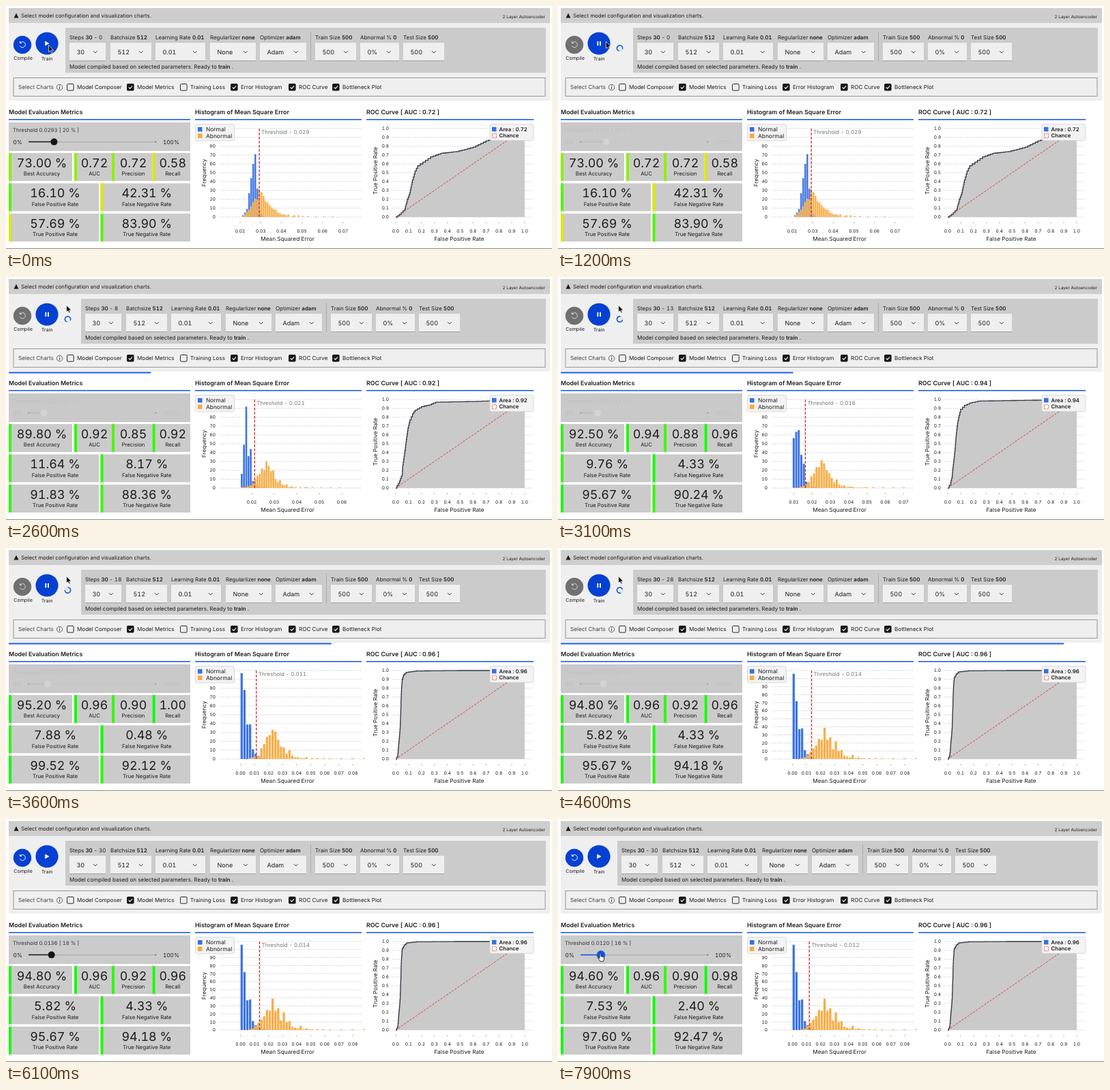
An HTML page that plays this animation: 800 px wide and 357 px high, repeating every 8000 ms.

```html
<!DOCTYPE html>
<html lang="en">
<head>
<meta charset="utf-8">
<title>Model training dashboard</title>
<style>
  html, body { margin: 0; width: 100%; height: 100%; overflow: hidden; background: #fff; }
  svg { display: block; width: 100vw; height: 100vh; }
  text { font-family: Inter, "Open Sans", sans-serif; font-variant-numeric: tabular-nums;
         text-rendering: geometricPrecision; white-space: pre; }
  .b { font-weight: 600; }
</style>
</head>
<body>
<svg viewBox="0 0 800 357" preserveAspectRatio="none"><g id="base"></g><g id="live"></g></svg>
<script>
const LOOP = 8000, FRAME = 100;
const TRAIN_START = 1000, TRAIN_END = 4900;
const BLUE = '#0540d2', RULE = '#1b5fe3', PANEL = '#cbcbcb', SOFT = '#efeff0', INK = '#1c1c1c';

const lerp = (a, b, p) => a + (b - a) * p;
const clamp = v => Math.max(0, Math.min(1, v));
const span = (t, a, b) => clamp((t - a) / (b - a));
const range = n => [...Array(n).keys()];
const rect = (x, y, w, h, fill, extra = '') =>
  `<rect x="${x}" y="${y}" width="${w}" height="${h}" fill="${fill}" ${extra}/>`;
const line = (x1, y1, x2, y2, color, w = 1, extra = '') =>
  `<path d="M${x1} ${y1}L${x2} ${y2}" stroke="${color}" stroke-width="${w}" ${extra}/>`;
const path = (d, color, w, extra = 'fill="none"') =>
  `<path d="${d}" stroke="${color}" stroke-width="${w}" ${extra}/>`;
const circle = (x, y, r, fill, extra = '') =>
  `<circle cx="${x}" cy="${y}" r="${r}" fill="${fill}" ${extra}/>`;
const text = (x, y, size, str, extra = '', fill = INK) =>
  `<text x="${x}" y="${y}" font-size="${size}" fill="${fill}" ${extra}>${str}</text>`;
const bold = s => `<tspan class="b">${s}</tspan>`;
const MID = 'text-anchor="middle"', END = 'text-anchor="end"';

// Model state at a few training steps; everything between is interpolated.
const states = [
  { step: 2, acc: 73, auc: .72, prec: .72, fpr: 16.1, tpr: 57.69, thr: .0293, pct: 20,
    zero: 282.6, unit: 30.2, x0: 347.2, pitch: 3.02, yMax: 100,
    blue: [2, 5, 9, 27, 44, 60, 71, 32, 8, 3, 1],
    orange: [1, 3, 6, 8, 12, 17, 21, 20, 31, 28, 24, 18, 16, 13, 11, 9, 8, 5, 4, 3, 3, 2, 3, 0, 1, 2, 0, 2, 0, 1],
    roc: [0,0, .03,.03, .07,.09, .09,.2, .11,.28, .13,.42, .15,.52, .17,.58, .21,.62, .27,.68, .35,.72, .47,.74, .6,.79, .7,.86, .82,.91, 1,1] },
  { step: 8, acc: 89.8, auc: .92, prec: .85, fpr: 11.64, tpr: 91.83, thr: .0213, pct: 12,
    zero: 294, unit: 33, x0: 345.4, pitch: 3.3, yMax: 100,
    blue: [16, 49, 92, 36, 44, 8, 4, 2, 2, 1, 1],
    orange: [1, 1, 1, 2, 3, 5, 10, 14, 16, 22, 20, 30, 25, 19, 20, 10, 7, 9, 4, 3, 4, 1, 2, 1, 1, 0, 1, 0, 1, 1],
    roc: [0,0, .03,.08, .05,.16, .055,.26, .065,.36, .075,.46, .085,.58, .095,.68, .11,.77, .13,.84, .15,.88, .2,.92, .26,.94, .31,.97, .65,.98, 1,1] },
  { step: 18, acc: 95.2, auc: .96, prec: .9, fpr: 7.88, tpr: 99.52, thr: .0113, pct: 15,
    zero: 343.5, unit: 20.6, x0: 345.3, pitch: 4.12, yMax: 100,
    blue: [97, 78, 39, 39, 11, 6, 3, 2, 1, 2, 1],
    orange: [0, 0, 0, 1, 2, 3, 4, 12, 17, 25, 27, 33, 31, 22, 14, 13, 6, 10, 4, 2, 2, 1, 1, 2, 0, 1, 0, 1, 0, 1],
    roc: [0,0, .015,.04, .02,.12, .025,.2, .03,.28, .035,.37, .037,.46, .04,.58, .042,.7, .045,.8, .05,.9, .06,.95, .08,.98, .16,.995, .5,1, 1,1] },
  { step: 28, acc: 94.8, auc: .96, prec: .92, fpr: 5.82, tpr: 95.67, thr: .0136, pct: 18,
    zero: 343.5, unit: 20.6, x0: 345.3, pitch: 4.12, yMax: 110,
    blue: [106, 72, 37, 38, 11, 6, 3, 2, 1, 1, 1],
    orange: [0, 0, 0, 1, 2, 5, 9, 13, 17, 25, 24, 39, 24, 27, 12, 22, 10, 11, 4, 3, 2, 5, 1, 2, 1, 1, 0, 1, 0, 1],
    roc: [0,0, .015,.04, .02,.11, .025,.2, .03,.28, .035,.38, .037,.48, .04,.6, .042,.72, .045,.82, .05,.92, .065,.96, .085,.985, .16,.997, .5,1, 1,1] },
];
const dragged = { ...states[3], acc: 94.6, prec: .9, fpr: 7.53, tpr: 97.6, thr: .012, pct: 16 };

function mix(a, b, p) {
  const out = {};
  for (const k in a)
    out[k] = Array.isArray(a[k]) ? a[k].map((v, i) => lerp(v, b[k][i], p)) : lerp(a[k], b[k], p);
  return out;
}

function stateAt(t, step) {
  if (t >= 7500) return mix(states[3], dragged, t < 7700 ? .5 : 1);
  if (t >= TRAIN_END) return states[3];
  const i = step < 8 ? 0 : step < 18 ? 1 : 2;
  const a = states[i], b = states[i + 1];
  return mix(a, b, span(step, a.step, b.step));
}

function drawBase() {
  let s = rect(4, 3, 793, 22, '#cecece') + rect(4, 25, 793, 114, SOFT);
  s += `<path d="M11.5 17.5L15 10.5L18.5 17.5Z" fill="${INK}"/>`;
  s += text(22, 17.2, 7.85, 'Select model configuration and visualization charts.');
  s += text(790, 17.5, 6.3, '2 Layer Autoencoder', END);
  s += rect(11, 105.5, 779, 27, 'none', 'stroke="#8f8f8f" stroke-width=".9"');
  s += text(18, 122.3, 8.2, 'Select Charts', '', '#444');
  s += circle(78.6, 119.5, 4.2, 'none', 'stroke="#444" stroke-width=".8"') +
    line(78.6, 118.8, 78.6, 121.8, '#333') + circle(78.6, 117.2, .6, '#333');
  const boxes = [[89, 'Model Composer'], [177, 'Model Metrics', 1], [255, 'Training Loss'],
    [329, 'Error Histogram', 1], [414, 'ROC Curve', 1], [478, 'Bottleneck Plot', 1]];
  for (const [x, label, on] of boxes) {
    s += rect(x + .5, 114.5, 9.6, 9.6, on ? '#161616' : 'none', 'rx="1" stroke="#161616" stroke-width=".9"');
    if (on) s += path(`M${x + 2.7} 119.4l1.9 2 3.4-3.8`, '#fff', 1.1);
    s += text(x + 15, 122.3, 8.1, label);
  }
  for (const [x, w, label] of [[4, 266, 'Model Evaluation Metrics'], [277, 244, 'Histogram of Mean Square Error'], [528, 245, '']])
    s += text(x, 159.3, 8.85, label, 'class="b"') + rect(x, 166, w, 1.6, RULE);
  s += text(412.5, 345, 8.3, 'Mean Squared Error', MID) + text(664, 345, 8.3, 'False Positive Rate', MID);
  s += text(0, 0, 8.1, 'Frequency', MID + ' transform="translate(292.5 245) rotate(-90)"');
  s += text(0, 0, 8.3, 'True Positive Rate', MID + ' transform="translate(543.5 242) rotate(-90)"');
  return s + rect(0, 356, 800, 1, '#8c8c8c');
}

function drawControls(t, step, training) {
  const dx = training ? 23 : 0;
  const pressed = t >= 500 && t < 800;
  let s = rect(87 + dx, 32, 704 - dx, 66, PANEL);
  const fields = [[93, 53, 'Steps', '30', '30', ` - ${step}`], [153, 60, 'Batchsize', '512', '512'],
    [219, 73, 'Learning Rate', '0.01', '0.01'], [299, 67, 'Regularlizer', 'none', 'None'],
    [372, 68, 'Optimizer', 'adam', 'Adam'], [453, 60, 'Train Size', '500', '500'],
    [519, 57, 'Abnormal %', '0', '0%'], [582, 60, 'Test Size', '500', '500']];
  for (const [left, w, label, value, choice, tail = ''] of fields) {
    const x = left + dx;
    s += text(x, 48.7, 7.95, `${label} ${bold(value)}${tail}`);
    s += rect(x, 54, w, 26.5, SOFT) + rect(x, 80, w, .8, '#949494');
    s += text(x + 10.5, 70.8, 9, choice) + path(`M${x + w - 18} 66.2l2.8 2.8 2.8-2.8`, '#333', 1);
  }
  s += line(446.5 + dx, 38, 446.5 + dx, 81, '#8e8e8e', .8, 'stroke-dasharray="2 1.2"');
  s += text(93 + dx, 91.8, 8.05, `Model compiled based on selected parameters. Ready to ${bold('train')} .`);

  s += circle(24, 57, 13.2, training ? '#707070' : BLUE);
  s += path('M20.8 54.2a4.2 4.2 0 1 1 -.4 4.4M20.4 51.8v2.8h2.8', training ? '#ddd' : '#fff', .9);
  s += circle(60, 55, 16.6, pressed ? '#0334ad' : BLUE);
  s += training ? rect(57.3, 51.8, 1.9, 6.4, '#fff') + rect(61, 51.8, 1.9, 6.4, '#fff')
                : '<path d="M57.2 51.4L63.6 55L57.2 58.6Z" fill="#fff"/>';
  s += text(25, 79.2, 7.1, 'Compile', MID) + text(60, 80.3, 7.1, 'Train', MID);
  if (training) {
    s += circle(90.5, 62, 4.1, 'none', 'stroke="#d5d9e4" stroke-width="1.6"');
    s += circle(90.5, 62, 4.1, 'none', `stroke="${RULE}" stroke-width="1.7" stroke-dasharray="19 7" transform="rotate(${200 + t * .52} 90.5 62)"`);
    if (step) s += rect(4, 139.5, 26.43 * step - 3, 2, RULE);
  }
  return s;
}

function drawSlider(m, training, hover) {
  const x = 33 + 1.87 * m.pct;
  const dot = hover ? '#0f55e8' : '#161616';
  let s = rect(4, 171, 266, 42, training ? '#c9c9c9' : PANEL);
  s += `<g opacity="${training ? .07 : 1}">`;
  s += text(10, 185.2, 7.7, `Threshold ${m.thr.toFixed(4)} [ ${Math.round(m.pct)} % ]`, '', '#333');
  s += text(10.5, 202.8, 8.2, '0%') + text(230, 202.8, 8.2, '100%');
  s += line(33, 199.6, 219, 199.6, '#aaa', 1.2) + line(33, 199.6, x, 199.6, dot, 1.5);
  s += circle(219.3, 199.6, .8, '#333') + '</g>';
  if (training) return s + circle(33, 199.6, .8, '#777') + circle(219.3, 199.6, .8, '#777') + circle(x, 199.6, 5, '#d3d3d3');
  return s + circle(x, 199.6, hover ? 6.3 : 5, dot);
}

function drawMetrics(m) {
  const score = g => `rgb(${Math.round(510 * (1 - g))},${Math.round(255 - 50 * (1 - g))},0)`;
  const pct = v => v.toFixed(2) + ' %';
  const good = m.tpr / 100, clean = 1 - m.fpr / 100;
  const cards = [
    [4, 216, 93, pct(m.acc), 'Best Accuracy', m.acc / 100],
    [100, 216, 55, m.auc.toFixed(2), 'AUC', m.auc],
    [155, 216, 59, m.prec.toFixed(2), 'Precision', m.prec],
    [214.5, 216, 55.5, good.toFixed(2), 'Recall', good],
    [4, 260.5, 132, pct(m.fpr), 'False Positive Rate', clean],
    [138.5, 260.5, 131.5, pct(100 - m.tpr), 'False Negative Rate', good],
    [4, 305, 132, pct(m.tpr), 'True Positive Rate', good],
    [138.5, 305, 131.5, pct(100 - m.fpr), 'True Negative Rate', clean],
  ];
  return cards.map(([x, y, w, value, label, g]) => {
    const cx = x + w / 2 + 2;
    return rect(x, y, w, 41, PANEL) + rect(x, y, 4, 41, score(g)) +
      text(cx, y + 20.5, 17.9, value, MID) + text(cx, y + 33, 7.8, label, MID);
  }).join('');
}

const gridLine = (x1, x2, y) => line(x1, y, x2, y, '#c9c9c9', .8, 'stroke-dasharray="2 1.4"');

function drawHistogram(m) {
  const yOf = v => 310 - v * 130 / m.yMax;
  let s = '';
  for (let v = 0; v <= m.yMax; v += 10)
    s += gridLine(314, 521, yOf(v)) + text(307, yOf(v) + 2.4, 6.5, v, END);
  for (let k = 0; k < 9; k++) {
    const x = m.zero + k * m.unit;
    if (x > 340 && x < 512)
      s += line(x, 317, x, 319.5, '#999', .7) + text(x, 332.5, 6.6, (k / 100).toFixed(2), MID);
  }
  const bars = (list, fill) => list.map((v, i) =>
    rect(m.x0 + (i - .4) * m.pitch, yOf(v), m.pitch * .8, 310 - yOf(v), fill)).join('');
  s += bars(m.blue, '#3d75e2') + bars(m.orange, '#f6ae49');
  // sparse tail of single samples
  for (let i = 31; i < 46; i += 4)
    s += rect(m.x0 + i * m.pitch, 309, m.pitch * .8, 1, '#e0b06a');
  const x = m.zero + m.thr * 100 * m.unit;
  s += line(x, 180, x, 310, '#d62b2b', 1.3, 'stroke-dasharray="4 2"');
  s += text(x + 3, 188.3, 8, `Threshold - ${m.thr.toFixed(3)}`, '', '#777');
  s += rect(277.5, 173.5, 57, 24.5, '#f3f3f3', 'rx="2" stroke="#d2d2d2" stroke-width=".8"');
  s += rect(281, 178, 6.5, 6.5, '#3570e6') + rect(281, 187.5, 6.5, 6.5, '#f6a93c');
  return s + text(293, 184, 8.4, 'Normal') + text(293, 193.6, 8.4, 'Abnormal');
}

function drawRoc(m) {
  const px = v => (571 + v * 189).toFixed(1), py = v => (310 - v * 130).toFixed(1);
  let s = text(528, 159.3, 8.85, `ROC Curve [ AUC : ${m.auc.toFixed(2)} ]`, 'class="b"');
  for (const k of range(11)) {
    const v = k / 10, y = 310 - v * 130, x = 571 + v * 189;
    s += gridLine(565, 772, y) + text(561, y + 2.4, 6.5, v.toFixed(1), END);
    s += line(x, 317, x, 319.5, '#999', .7) + text(x, 332.5, 6.6, v.toFixed(1), MID);
  }
  // the curve climbs in small stairs
  let d = `M${px(0)} ${py(0)}`;
  for (let i = 2; i < m.roc.length; i += 2) {
    const [x0, y0, x1, y1] = m.roc.slice(i - 2, i + 2);
    const n = Math.max(2, Math.round(Math.hypot((x1 - x0) * 189, (y1 - y0) * 130) / 4));
    for (let j = 1; j <= n; j++)
      d += `H${px(lerp(x0, x1, j / n))}V${py(lerp(y0, y1, j / n))}`;
  }
  s += `<path d="${d}V310H571Z" fill="#c8c8c8" fill-opacity=".95"/>`;
  s += path(d, '#303744', 1.3);
  s += line(571, 310, 760, 180, '#e03a34', 1, 'stroke-dasharray="3 2"');
  s += rect(709, 173.5, 64, 24, '#f3f3f3', 'rx="2" stroke="#d2d2d2" stroke-width=".8"');
  s += rect(712, 177.8, 6.5, 6.5, '#3570e6') + rect(712.5, 187.8, 6, 6, '#fff', 'stroke="#e03a34" stroke-width=".8" stroke-dasharray="2 1"');
  return s + text(722.5, 183.8, 7.8, `Area : ${m.auc.toFixed(2)}`, 'class="b"') + text(722.5, 193.4, 7.8, 'Chance', 'class="b"');
}

function drawCursor(t, m) {
  if (t >= 5600 && t < 6300) return '';
  if (t >= 6600) {
    const x = 31 + 1.87 * m.pct;
    return `<path transform="translate(${x - 2} 197)" d="M2 1.2q1.2-1.2 2 0V5q1-.8 1.7.3 1-.6 1.5.5 1.4-.4 1.4 1V9.2l-1.2 3H3.2L0 8q-.4-1.4.9-1.2L2 7.6Z" fill="#fff" stroke="#111" stroke-width=".9"/>`;
  }
  let x, y;
  if (t < 5600) {
    const p = span(t, 1000, 1600), q = span(t, 1900, 2400);
    x = lerp(62.5, 85.8, p) + 2.8 * q;
    y = lerp(57.5, 41.8, p) - .3 * q;
  } else {
    const p = span(t, 6300, 6500);
    x = lerp(83, 65, p);
    y = lerp(167, 194, p);
  }
  return `<path transform="translate(${x} ${y})" d="M0 0V10L2.3 8L4 11.6L5.6 10.9L4 7.4H7Z" fill="#0a0a0a" stroke="#fff" stroke-width=".7"/>`;
}

const live = document.getElementById('live');
document.getElementById('base').innerHTML = drawBase();
let shown = -1;

function render(t) {
  const training = t >= TRAIN_START && t < TRAIN_END;
  const step = Math.max(0, Math.min(30, Math.floor(2 + (t - 1900) * 26 / 2700 + 1e-6)));
  const m = stateAt(t, step);
  live.innerHTML = drawControls(t, step, training) + drawSlider(m, training, t >= 6600) +
    drawMetrics(m) + drawHistogram(m) + drawRoc(m) + drawCursor(t, m);
}

function tick() {
  const t = Math.floor(performance.now() % LOOP / FRAME) * FRAME;
  if (t !== shown) render(shown = t);
  requestAnimationFrame(tick);
}
tick();
</script>
</body>
</html>
```
